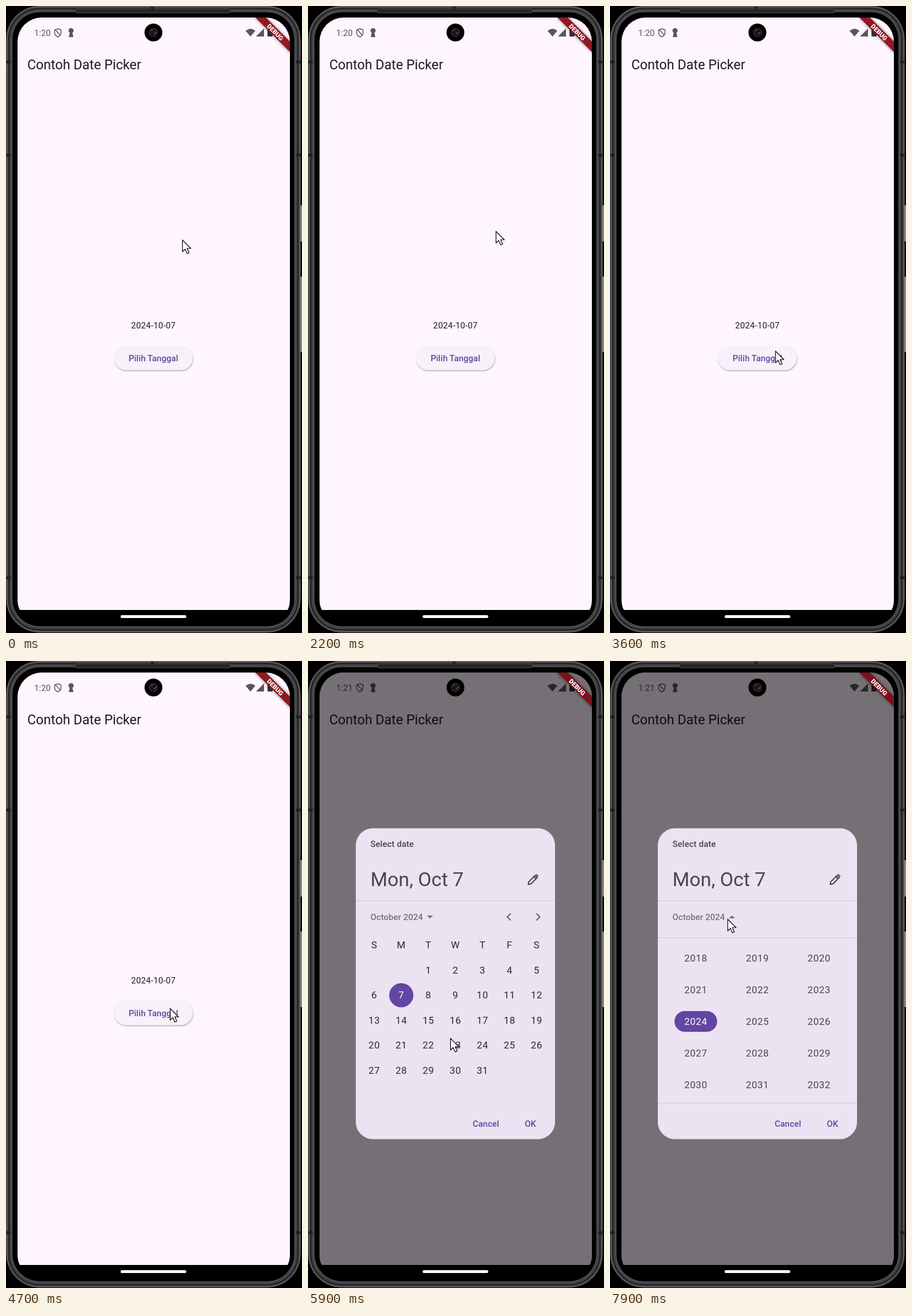
Write an HTML page that moves like this. It is 514 by 1089 pixels and loops after 8 s.

```html
<!DOCTYPE html>
<html lang="id">
<head>
<meta charset="utf-8">
<title>Date Picker</title>
<style>
html, body { margin: 0; height: 100%; overflow: hidden; background: #000; }
svg { display: block; width: 514px; height: 1089px; font: 14.8px Roboto, sans-serif; }
.label { font-weight: 500; letter-spacing: .1px; }
.action { fill: #6345a0; }
.cell { font-size: 16.9px; letter-spacing: .53px; text-anchor: middle; }
.rule { stroke: #cfc7d6; stroke-width: 1.2; }
</style>
</head>
<body>
<svg viewBox="0 0 514 1089">
  <defs>
    <clipPath id="screen"><path d="M20 62a42 42 0 0 1 42-42H451a42 42 0 0 1 42 42V1030q0 12-4 19H24q-4-7-4-19Z"/></clipPath>
    <filter id="blur" x="-30%" y="-30%" width="160%" height="160%"><feGaussianBlur stdDeviation="2.5"/></filter>
    <filter id="soft" x="-10%" y="-20%" width="120%" height="150%"><feGaussianBlur stdDeviation="1"/></filter>
  </defs>

  <!-- phone body -->
  <g fill="#8d8984"><rect x="508" y="346" width="6" height="63"/><rect x="508" y="470" width="6" height="131"/></g>
  <rect x="1" y=".5" width="510" height="1087" rx="57" fill="#4b4b4e" stroke="#707073"/>
  <rect x="5" y="4.500" width="502" height="1079" rx="53" fill="#434346" stroke="#1c1c1e" stroke-width="2"/>
  <rect x="10.500" y="10" width="491" height="1068" rx="48" fill="#000" stroke="#67676a"/>
  <rect x="120" y="5" width="270" height="7" rx="3" fill="#252527" stroke="#515154"/>
  <path d="M1 97h7M1 259h7M1 993h7M504 97h7M504 259h7M504 993h7M254 1v6" stroke="#202022" stroke-width="5"/>
  <rect x="199" y="1058" width="114" height="5" rx="2.500" fill="#fff"/>

  <g clip-path="url(#screen)">
    <rect width="514" height="1089" fill="#fef5ff"/>
    <g fill="#59565b">
      <text id="clock" x="49" y="51.500"></text>
      <path d="M90 39.500l5.500 2v5q0 5-5.500 7-5.500-2-5.500-7v-5ZM85.500 41l9 10" fill="none" stroke="#59565b" stroke-width="1.500"/>
      <path d="M113 38.500a4.300 4.300 0 0 1 2.300 8l1.700 7.500h-8l1.700-7.500a4.300 4.300 0 0 1 2.300-8Z"/>
      <path d="M416 43q9-7 17 0l-8.500 10ZM434 53l14-14v14Z"/>
      <rect x="454" y="39" width="9" height="14" rx="1.500" fill="#38363a"/>
    </g>
    <text x="37" y="110" font-size="23.200" fill="#1d1b20">Contoh Date Picker</text>
    <text x="256" y="559.500" text-anchor="middle" letter-spacing=".26" fill="#1d1b20">2024-10-07</text>
    <rect x="188" y="592" width="137" height="42" rx="21" opacity=".3" filter="url(#soft)"/>
    <rect id="button" x="187.500" y="590.500" width="137" height="42" rx="21"/>
    <text class="label action" x="256" y="617" text-anchor="middle">Pilih Tanggal</text>
    <rect id="scrim" width="514" height="1089" opacity=".54"/>
    <g transform="translate(493 20) rotate(45)">
      <rect x="-44" y="29.600" width="88" height="13" opacity=".5" filter="url(#blur)"/>
      <rect id="banner" x="-44" y="29.600" width="88" height="12.700"/>
      <text y="40" text-anchor="middle" font-size="11" font-weight="900" fill="#fff">DEBUG</text>
    </g>
  </g>
  <circle cx="256" cy="46" r="15.500"/>
  <circle cx="256" cy="46" r="7" fill="#171417" stroke="#2c2529" stroke-width="2"/>
  <path d="M252 43l3-2M257 49l4-4" stroke="#76545c" stroke-width="1.500"/>

  <g id="dialog" fill="#49454f">
    <rect x="83" y="290.500" width="346" height="540" rx="29.600" fill="#ebe3f1"/>
    <text class="label" x="108.500" y="323">Select date</text>
    <text x="108.500" y="391" font-size="33.800">Mon, Oct 7</text>
    <path d="M382.500 388l.8-4.500 11-11 3.700 3.700-11 11ZM392 374.500l3.700 3.700M396 370.500l3.700 3.700" fill="none" stroke="#49454f" stroke-width="2"/>
    <path class="rule" d="M83 416.500H429"/>
    <text class="label" x="108.500" y="449.500" fill="#77717c">October 2024</text>
    <path id="arrow" d="M206.500-2.500h10.500l-5.250 5.250Z" fill="#77717c"/>
    <text class="label action" x="286" y="809">Cancel</text>
    <text class="label action" x="376.500" y="809">OK</text>
    <g id="days" fill="#2b2830">
      <path d="M352 438.500l-6 6 6 6M396.500 438.500l6 6-6 6" fill="none" stroke="#645f69" stroke-width="2"/>
      <circle cx="162" cy="580.500" r="21" fill="#6345a3"/>
    </g>
    <g id="years">
      <path class="rule" d="M83 480.500H429M83 768H429"/>
      <rect x="112" y="608" width="74" height="36" rx="18" fill="#6345a3"/>
    </g>
  </g>

  <path id="cursor" d="M.5.5V20.500l4.600-4.300 3.400 7.800 3.400-1.500-3.300-7.500h6.200Z" fill="#fff" stroke="#000" stroke-width="1.200"/>
</svg>
<script>
const LOOP = 8000, STEP = 100;
const CLOCK_TICK = 5000, PRESS = 5700, OPEN = 5900, SHOW_YEARS = 7500;
// time, x, y of the pointer tip
const path = [
  [0, 306, 406], [2200, 326, 391], [2800, 326, 391], [3500, 287, 599], [4600, 287, 599],
  [5200, 255, 654], [5700, 250, 631], [5800, 250, 631], [5900, 247, 655], [6100, 247, 655],
  [6800, 174, 450], [7300, 204, 448], [8000, 204, 448]
];
const el = id => document.getElementById(id);
const show = (id, on) => el(id).setAttribute('display', on ? 'inline' : 'none');

function addCell(group, x, y, label, selected) {
  const text = document.createElementNS('http://www.w3.org/2000/svg', 'text');
  text.setAttribute('class', 'cell');
  text.setAttribute('x', x);
  text.setAttribute('y', y + 6);
  if (selected) text.setAttribute('fill', '#fff');
  text.textContent = label;
  el(group).append(text);
}

[...'SMTWTFS'].forEach((name, i) => addCell('days', 115 + 47 * i, 493, name));
for (let day = 1; day <= 31; day++) {
  const slot = day + 1;
  addCell('days', 115 + 47 * (slot % 7), 536.5 + 43.5 * Math.floor(slot / 7), day, day === 7);
}
for (let i = 0; i < 15; i++) {
  addCell('years', 149 + 107 * (i % 3), 516 + 55 * Math.floor(i / 3), 2018 + i, i === 6);
}

function pointerAt(t) {
  const i = path.findIndex(point => point[0] > t);
  const [t0, x0, y0] = path[i - 1], [t1, x1, y1] = path[i];
  const p = (t - t0) / (t1 - t0), k = p * p * (3 - 2 * p);
  return [x0 + (x1 - x0) * k, y0 + (y1 - y0) * k];
}

function draw(now) {
  const t = Math.floor(now % LOOP / STEP) * STEP;
  const open = t >= OPEN, years = t >= SHOW_YEARS;
  el('clock').textContent = t < CLOCK_TICK ? '1:20' : '1:21';
  el('button').setAttribute('fill', t < PRESS ? '#f7f1fa' : '#f0e8f6');
  el('banner').setAttribute('fill', open ? '#7d101c' : '#901823');
  show('scrim', open);
  show('dialog', open);
  show('days', !years);
  show('years', years);
  el('arrow').setAttribute('transform', `translate(0 444.5) scale(1 ${years ? -1 : 1})`);
  el('cursor').setAttribute('transform', `translate(${pointerAt(t)})`);
  requestAnimationFrame(draw);
}
requestAnimationFrame(draw);
</script>
</body>
</html>
```
